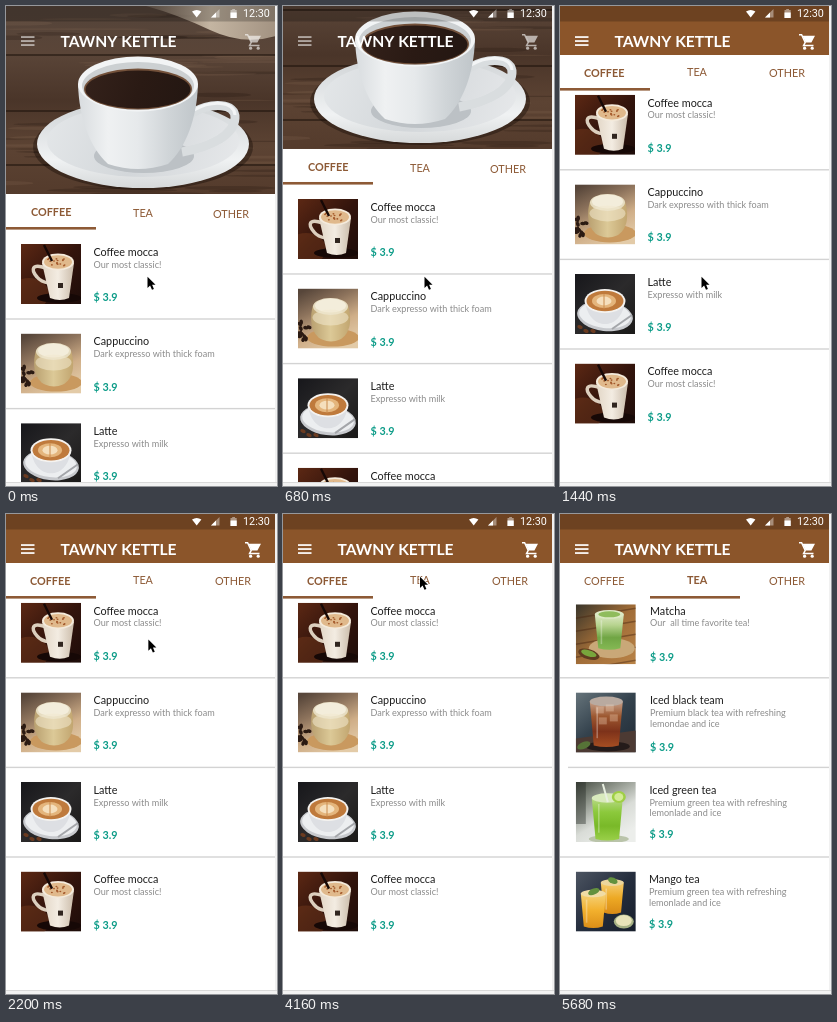
Recreate the animation shown at these times as an HTML page with a canvas. Size 271 by 480 pixels, loop 5720 ms.

```html
<!DOCTYPE html>
<html lang="en">
<head>
<meta charset="utf-8">
<title>Cafe menu</title>
<style>
  html, body { margin: 0; width: 100%; height: 100%; overflow: hidden; background: #fff; }
  canvas { display: block; width: 271px; height: 480px; }
</style>
</head>
<body>
<canvas id="stage"></canvas>
<script>
const W = 271, H = 480, LOOP = 5720;
const BROWN = '#8b552a', TAB = '#8d5a36', TEAL = '#0d9c88';
const SANS = 'Lato, "Open Sans", sans-serif';
const PITCH = 89.6, PINNED = 49, OPEN = 188;

const canvas = document.getElementById('stage');
const g = canvas.getContext('2d');
const dpr = window.devicePixelRatio || 1;
canvas.width = W * dpr;
canvas.height = H * dpr;

const clamp = x => Math.max(0, Math.min(1, x));
const mix = (a, b, k) => a + (b - a) * k;
const ease = (t, from, to) => {
  const x = clamp((t - from) / (to - from));
  return x * x * (3 - 2 * x);
};

function rect(x, y, w, h, fill) {
  g.fillStyle = fill;
  g.fillRect(x, y, w, h);
}

function oval(x, y, rx, ry, fill, turn = 0) {
  g.beginPath();
  g.ellipse(x, y, rx, ry, turn, 0, 7);
  g.fillStyle = fill;
  g.fill();
}

function shape(path, fill) {
  g.fillStyle = fill;
  g.fill(new Path2D(path));
}

function stroke(path, color, width) {
  g.strokeStyle = color;
  g.lineWidth = width;
  g.stroke(new Path2D(path));
}

function fade(x0, y0, x1, y1, ...colors) {
  const f = g.createLinearGradient(x0, y0, x1, y1);
  colors.forEach((c, i) => f.addColorStop(i / (colors.length - 1), c));
  return f;
}

function text(str, x, y, size, color, weight = 400, font = SANS) {
  g.font = `${weight} ${size}px ${font}`;
  g.fillStyle = color;
  g.fillText(str, x, y);
}

function seeded(n) {
  return () => (n = (n * 16807) % 2147483647) / 2147483647;
}

// Runs draw() in local coordinates, clipped to a w x h box.
function boxed(x, y, w, h, draw) {
  g.save();
  g.translate(x, y);
  g.beginPath();
  g.rect(0, 0, w, h);
  g.clip();
  draw();
  g.restore();
}

// ---- pictures ----

function hero() {
  rect(0, 0, 270, OPEN, fade(0, 0, 0, OPEN, '#54443a', '#5a4538', '#4a3529', '#5c4333', '#543b2c'));
  const rnd = seeded(41);
  for (let i = 0; i < 60; i++) {
    const tone = rnd() > 0.5 ? 'rgba(150,118,94,.16)' : 'rgba(20,10,6,.2)';
    oval(rnd() * 270, rnd() * OPEN, 25 + rnd() * 50, 0.6 + rnd() * 1.8, tone);
  }
  for (const y of [48, 104, 158]) rect(0, y, 270, 2, 'rgba(25,14,9,.5)');
  shape('M140 0H270V30Q238 40 204 24T140 0Z', fade(140, 0, 270, 10, 'rgba(196,178,158,.2)', '#c4b5a2', '#a39382'));

  oval(137, 141, 110, 43, 'rgba(20,10,6,.4)');
  oval(137, 138, 106, 44, fade(0, 96, 0, 182, '#d0d4d6', '#dfe2e4', '#f0f2f3', '#d6d9da'));
  oval(137, 135, 96, 36, fade(40, 100, 230, 165, '#e4e7e9', '#d3d7da', '#e6e8ea'));
  oval(138, 150, 50, 17, '#bcc1c5');
  stroke('M186 107C206 96 230 97 229 112C228 129 205 141 176 146', '#d9dddf', 9);
  stroke('M188 104C206 94 228 95 229 109', '#f3f5f6', 3);
  shape('M72 78C73 112 84 142 102 158Q132 168 162 158C180 142 191 112 192 78Z',
    fade(72, 0, 192, 0, '#d8dcdf', '#eff1f2', '#e6e9eb', '#d0d5d8', '#bfc5c9'));
  oval(132, 78, 60, 27.5, '#f2f4f5');
  oval(132, 80, 56, 24, '#ccd0d2');
  oval(132, 83, 54, 20.5, '#74513a');
  oval(132, 83.5, 52.5, 19, fade(85, 70, 180, 100, '#33211a', '#2a1a14', '#241712'));
}

function mocca() {
  rect(0, 0, 60, 60, fade(0, 0, 60, 60, '#5c2814', '#33140c', '#1d0c09'));
  oval(8, 50, 20, 16, 'rgba(120,60,30,.45)');
  oval(38, 54, 22, 5, '#160806');
  stroke('M25 24C10 19 10 26 16 33Q20 38 28 39', '#dccfbe', 3.5);
  shape('M21 19L29 54Q39 58 48 54L53 19Z', fade(21, 0, 53, 0, '#e2d6c6', '#f3ece2', '#cbbcaa'));
  oval(37, 18, 16, 8.5, '#f4eadb');
  oval(37, 18, 14, 6.8, '#e0b98c');
  const rnd = seeded(9);
  for (let i = 0; i < 16; i++) oval(27 + rnd() * 20, 14 + rnd() * 8, 1, 0.8, '#a45a2c');
  stroke('M23 1L31 17', '#160806', 2.4);
  rect(37, 39, 5, 5, '#30251f');
}

function cappuccino() {
  rect(0, 0, 60, 60, fade(10, 0, 40, 60, '#57463a', '#8d735c', '#cfae88', '#e3cba8'));
  oval(35, 49, 26, 9, '#c9995f');
  shape('M15 17C11 30 13 46 24 51Q33 55 42 51C53 45 54 30 50 17Z', fade(13, 0, 52, 0, '#b9a070', '#dcc997', '#c2a670'));
  oval(32.5, 18, 17.5, 8.5, '#e6dcc0');
  oval(32.5, 17, 15.5, 7, '#f3eddb');
  oval(32.5, 29, 18, 8, 'rgba(243,234,208,.55)');
  const rnd = seeded(5);
  for (let i = 0; i < 13; i++) oval(rnd() * 12, 32 + rnd() * 20, 2.6, 1.8, '#2b1a12', rnd() * 3);
}

function latte() {
  rect(0, 0, 60, 60, fade(0, 0, 60, 60, '#17171b', '#2b2a2b', '#1a1918'));
  oval(30, 42, 28, 15, '#c7c9cd', 0.12);
  oval(30, 41, 26, 13, '#eceef0', 0.12);
  shape('M10 27C12 43 21 50 30 50S48 43 50 27Z', '#dddfe3');
  oval(30, 27, 20.5, 12, '#f5f3f0');
  oval(30, 27, 18.5, 10.3, '#bf7a3c');
  oval(29, 27, 12, 7, '#e4b57c');
  oval(29, 27, 7.5, 4.4, '#f5dfbd');
  stroke('M29 20V35', '#c98a4c', 1);
  stroke('M37 55L57 41', '#a4a6aa', 2);
  for (const [x, y] of [[5, 53], [11, 57], [18, 57]]) oval(x, y, 2.8, 1.8, '#6b3b20', 0.4);
}

function glass(x, y, w, h, liquid, top) {
  const b = w * 0.12;
  shape(`M${x} ${y}L${x + b} ${y + h}Q${x + w / 2} ${y + h + 3} ${x + w - b} ${y + h}L${x + w} ${y}Z`, liquid);
  oval(x + w / 2, y, w / 2, w * 0.15, top);
  rect(x + w * 0.2, y + 6, 1.6, h * 0.7, 'rgba(255,255,255,.3)');
}

function matcha() {
  rect(0, 0, 60, 60, fade(0, 0, 60, 60, '#39352a', '#a16d38', '#b98347'));
  for (let i = 0; i < 5; i++) stroke(`M0 ${14 + i * 13}L60 ${4 + i * 13}`, 'rgba(70,36,16,.45)', 1.4);
  oval(36, 44, 23, 10, '#c9a878');
  glass(19, 10, 29, 34, fade(0, 8, 0, 46, '#e4ecd0', '#b8d490', '#70a544', '#86ba55'), '#dce9c4');
  oval(33.5, 10, 11, 3, '#8fbc5c');
  oval(13, 50, 11, 5, '#5f3c20', 0.3);
  oval(13, 49, 8, 3, '#78a63c', 0.3);
}

function blackTea() {
  rect(0, 0, 60, 60, fade(0, 0, 50, 60, '#66747b', '#34424d', '#222d38'));
  shape('M0 46L60 38V60H0Z', '#4c3a33');
  oval(32, 54, 22, 5, '#241b1a');
  glass(14, 9, 33, 44, fade(0, 9, 0, 54, '#c5a08a', '#9d5830', '#7d321a', '#a54d22'), '#b9aaa0');
  for (const [x, y] of [[20, 14], [30, 12], [34, 22], [23, 25]]) rect(x, y, 8, 7, 'rgba(242,214,190,.32)');
  oval(8, 53, 7, 3.5, '#567337', -0.4);
}

function greenTea() {
  rect(0, 0, 60, 60, fade(0, 0, 36, 60, '#454b42', '#8f958b', '#d9dcd7', '#eceeeb'));
  rect(0, 0, 10, 42, 'rgba(30,36,30,.4)');
  oval(33, 57, 20, 4, '#bac4aa');
  glass(16, 16, 31, 41, fade(0, 16, 0, 58, '#b9d989', '#8cc93c', '#79b928', '#99cf48'), '#d9eabd');
  oval(43, 15, 7, 6, '#9fcf45');
  oval(43, 15, 4.5, 4, '#d3eb95');
  stroke('M27 2L32 20', '#e8efe0', 2);
}

function mango() {
  rect(0, 0, 60, 60, fade(0, 0, 60, 60, '#4c5461', '#252e3e', '#171e2b'));
  glass(25, 11, 23, 30, fade(0, 11, 0, 42, '#f4cd72', '#eda924', '#d98b16'), '#ecd69d');
  glass(5, 22, 25, 33, fade(0, 22, 0, 56, '#f5d279', '#f2b02d', '#dc8f18'), '#f0dca6');
  oval(18, 20, 6, 3, '#63913e', -0.4);
  oval(37, 9, 5, 3, '#63913e', 0.4);
  oval(48, 50, 10, 7, '#a6b184');
  oval(48, 49, 8, 5.5, '#e8e3b9');
}

// ---- menu data ----

const classic = { pic: mocca, name: 'Coffee mocca', info: ['Our most classic!'] };
const coffees = [
  classic,
  { pic: cappuccino, name: 'Cappuccino', info: ['Dark expresso with thick foam'] },
  { pic: latte, name: 'Latte', info: ['Expresso with milk'] },
  classic
];
const teas = [
  { pic: matcha, name: 'Matcha', info: ['Our  all time favorite tea!'], x: 90, top: 1.5, price: 58 },
  { pic: blackTea, name: 'Iced black team', info: ['Premium black tea with refreshing', 'lemondae and ice'], x: 90, line: 8, price: 59 },
  { pic: greenTea, name: 'Iced green tea', info: ['Premium green tea with refreshing', 'lemonlade and ice'], x: 89.5, price: 56 },
  { pic: mango, name: 'Mango tea', info: ['Premium green tea with refreshing', 'lemonlade and ice'], x: 89, price: 56 }
];

function list(items, dx, y0, picX) {
  items.forEach((item, i) => {
    const y = y0 + i * PITCH, x = dx + (item.x || 87.5);
    boxed(dx + picX, y + (item.top || 0), 60, 60, item.pic);
    text(item.name, x, y + 11.8, 10.8, '#1c1c1c');
    item.info.forEach((s, n) => text(s, x, y + 23.6 + n * 10.5, 9.1, '#8b8b8b'));
    text('$ 3.9', x, y + (item.price || 57), 10.8, TEAL, 700);
    if (i < 3) {
      const left = item.line || 0;
      rect(dx + left, y + 74.3, 269 - left, 1.4, '#d3d3d3');
    }
  });
}

// ---- chrome ----

function tabs(y, k, slide) {
  rect(0, y, 269, 36, '#fff');
  const weight = on => on ? 700 : 400;
  text('COFFEE', mix(25, 24, k), y + 22, 10.8, TAB, weight(slide < 0.5));
  text('TEA', 127, y + mix(23, 21.3, k), 10.8, TAB, weight(slide >= 0.5));
  text('OTHER', mix(207, 209, k), y + mix(24, 22.2, k), 10.8, TAB);
  rect(90 * slide, y + 33, 90, 2.6, TAB);
}

function statusBar() {
  rect(0, 0, 269, 15.5, 'rgba(0,0,0,.22)');
  shape('M186 5.5Q190.7 2.5 195.4 5.5L190.7 11.5Z', '#fff');
  shape('M213.5 3V11.5H205Z', 'rgba(255,255,255,.4)');
  shape('M210 6.5V11.5H205Z', '#fff');
  rect(224.5, 4, 6.2, 8, 'rgba(255,255,255,.45)');
  rect(226.2, 3, 2.8, 1, 'rgba(255,255,255,.45)');
  rect(224.5, 6.5, 6.2, 5.5, '#fff');
  text('12:30', 237, 11, 10.8, '#fff', 400, 'Roboto, sans-serif');
}

function toolbar(k) {
  const tint = `rgba(255,255,255,${mix(0.6, 1, k)})`;
  for (const y of [30.2, 34.2, 38.2]) rect(15, y, 13.5, 1.7, tint);
  text('TAWNY KETTLE', 54.5, 40.6, 15.6, '#fff', 700);
  stroke('M239 28.8H241.6L245.2 36.4L243.6 39.4H253.5', tint, 1.5);
  shape('M242.5 29.8H255L251.4 36.6H245.6Z', tint);
  oval(244.6, 42.2, 1.6, 1.6, tint);
  oval(252.2, 42.2, 1.6, 1.6, tint);
}

function pointer(x, y) {
  const arrow = new Path2D('M0 0V11.2L2.6 8.8L4.5 13L6.4 12.2L4.6 8H8Z');
  g.save();
  g.translate(x, y);
  g.lineWidth = 1.5;
  g.strokeStyle = '#fff';
  g.stroke(arrow);
  g.fillStyle = '#000';
  g.fill(arrow);
  g.restore();
}

function draw(t) {
  const scroll = 149.2 * ease(t, 260, 1415);
  const edge = Math.max(PINNED, OPEN - scroll);
  const k = clamp((scroll - 126) / 13);
  const slide = ease(t, 4180, 4480);

  g.setTransform(dpr, 0, 0, dpr, 0, 0);
  rect(0, 0, W, H, '#fff');

  boxed(0, 0, 269, 476, () => {
    if (slide < 1) list(coffees, -270 * slide, 238 - scroll, 15);
    if (slide > 0) list(teas, 270 * (1 - slide), 88.8, 15.8);
    tabs(edge, k, slide);
    boxed(0, 0, 269, edge, () => {
      if (k < 1) {
        g.save();
        g.translate(0, edge - OPEN);
        hero();
        g.restore();
      }
      g.globalAlpha = k;
      rect(0, 0, 269, edge, BROWN);
      g.globalAlpha = 1;
      statusBar();
      toolbar(k);
    });
  });

  rect(269, 0, 2, H, '#f1f1f1');
  rect(0, 476, W, 1.2, '#d9d9d9');
  rect(0, 477.2, W, 2.8, '#f2f2f2');

  if (t < 5480) {
    const rise = ease(t, 1500, 2577), press = ease(t, 3300, 4100);
    const x = mix(mix(141.5, 142.5, clamp(rise / 0.7)), 138, clamp((rise - 0.71) / 0.29));
    pointer(x - press, mix(270.8, 68.8, rise) - 6 * press);
  }
}

const start = performance.now();
function tick() {
  draw((performance.now() - start) % LOOP);
  requestAnimationFrame(tick);
}
tick();
</script>
</body>
</html>
```
